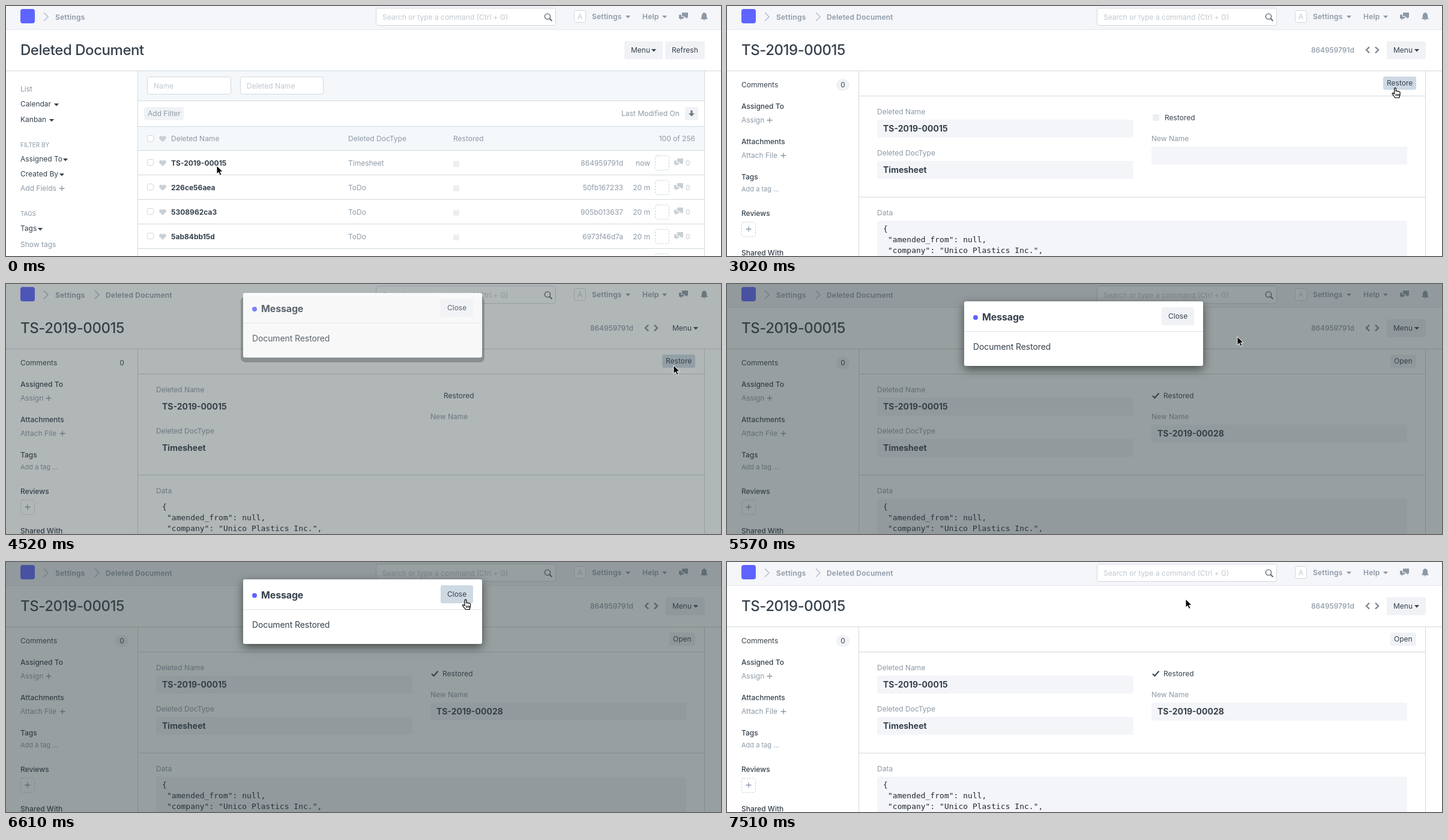
These frames come from a looping animation (1191x418 px, 8 s). An HTML page:

```html
<!DOCTYPE html>
<html lang="en">
<head>
<meta charset="utf-8">
<title>Restore a deleted document</title>
<style>
html, body { margin: 0; width: 100%; height: 100%; overflow: hidden; background: #fff; }
svg { display: block; width: 1191px; height: 418px; }
text { font: 400 12px Inter, sans-serif; fill: #36414c; white-space: pre; }
.grey { fill: #8d99a6; }
.pale { fill: #c0c8cf; }
.med { font-weight: 500; }
.bold { font-weight: 700; }
.nav { font-weight: 600; letter-spacing: .2px; fill: #8d99a6; }
.title { font-size: 24px; font-weight: 500; letter-spacing: -.45px; }
.value { font-size: 14px; font-weight: 700; }
.body { font-size: 14px; letter-spacing: -.1px; }
.head { font-size: 16px; font-weight: 700; letter-spacing: -.15px; }
.caps { font-size: 10px; fill: #8d99a6; }
.small { font-size: 11px; fill: #8d99a6; }
.code { font: 13px "DejaVu Sans Mono", monospace; fill: #1f272e; }
.end { text-anchor: end; }
.mid { text-anchor: middle; }
.line { stroke: #d1d8dd; fill: none; }
.box { stroke: #d1d8dd; fill: #fff; }
.flat .fill { opacity: 0; }
</style>
</head>
<body>
<svg id="stage" viewBox="0 0 1191 418" xmlns="http://www.w3.org/2000/svg"></svg>
<script>
const PANEL = '#f4f5f9', BUTTON = '#f0f2f6', HOVER = '#cdd9e3', TINT = '#f4f8fb', DARK = '#36414c', GREY = '#8d99a6', PALE = '#c8d0d6';

const text = (x, y, str, cls = '') => `<text x="${x}" y="${y}" class="${cls}">${str}</text>`;
const rect = (x, y, w, h, fill, r = 0, extra = 'class="fill"') =>
  `<rect x="${x}" y="${y}" width="${w}" height="${h}" rx="${r}" fill="${fill}" ${extra}/>`;
const box = (x, y, w, h, r = 3) => rect(x + .5, y + .5, w - 1, h - 1, '#fff', r, 'class="box"');
const dashed = (x, y) => rect(x + .5, y + .5, 23, 24, 'none', 3, 'stroke="#cbd2d8" stroke-dasharray="3 2"');
const hline = (y, x1 = 220, x2 = 1163) => `<path class="line" d="M${x1} ${y + .5}H${x2}"/>`;
const caret = (x, y, fill = DARK) => `<path d="M${x - 4} ${y - 2}h8l-4 4.5z" fill="${fill}"/>`;
const plus = (x, y) => `<path d="M${x - 4.5} ${y}h9M${x} ${y - 4.5}v9" stroke="${GREY}" stroke-width="1.3"/>`;
const chevron = (x, y, w, h, color, width) =>
  `<path d="M${x} ${y - h}l${w} ${h}l${-w} ${h}" fill="none" stroke="${color}" stroke-width="${width}"/>`;
const heart = (x, y) =>
  `<path transform="translate(${x} ${y})" fill="${PALE}" d="M0 5.5L-5.2 .2C-7.6-2.7-3.4-7 0-3.2 3.4-7 7.6-2.7 5.2 .2z"/>`;
const chat = (x, y, fill) => `<g transform="translate(${x} ${y})" fill="${fill}">
  <path d="M5 0h10v8h-1.500v2.500l-2.500-2.500H9V6H5z"/><path d="M0 3.500h4V7h4v3H5l-2.500 2.800V10H0z"/></g>`;
const group = (id, body) => `<g id="${id}">${body}</g>`;

const header = rect(0, 0, 1191, 39, '#f5f6fa') + rect(0, 39, 1191, 1, '#e6e9ee')
  + rect(24, 5, 24, 24, '#5e64ff', 4, '')
  + chevron(63, 18, 7, 7, '#b8c2cc', 1.6) + text(82, 23, 'Settings', 'nav')
  + box(616, 3, 300, 30) + text(627, 23, 'Search or type a command (Ctrl + G)', 'pale')
  + `<g fill="none" stroke="#5b6670"><circle cx="902" cy="17.500" r="4.600" stroke-width="1.400"/>
     <path d="M905.500 21l4 4" stroke-width="2"/></g>`
  + box(946, 7, 20, 21) + text(956, 22, 'A', 'pale mid')
  + text(976, 22, 'Settings', 'nav') + caret(1036, 18, GREY)
  + text(1060, 22, 'Help', 'nav') + caret(1097, 18, GREY)
  + chat(1121, 11, GREY)
  + `<path fill="${GREY}" d="M1162 11.500q1-1.500 2 0 3 .8 3 4.500 0 4 2 6h-12q2-2 2-6 0-3.700 3-4.500zM1161 22.500h4q-2 2.800-4 0z"/>`
  + hline(108, 0, 1191) + `<path class="line" d="M219.500 109V418M1163.500 109V418"/>`;

const rows = [
  ['TS-2019-00015', 'Timesheet', '864959791d', 'now'],
  ['226ce56aea', 'ToDo', '50fb167233', '20 m'],
  ['5308962ca3', 'ToDo', '905b013637', '20 m'],
  ['5ab84bb15d', 'ToDo', '6973f46d7a', '20 m']
].map(([name, type, id, age], i) => {
  const y = 242 + i * 41;
  return box(235, y + 14, 11, 11, 2) + heart(261, y + 20.5)
    + text(275, y + 25, name, 'bold') + text(570, y + 25, type, 'grey')
    + rect(745, y + 17, 10, 10, '#eceff2', 2) + text(1028, y + 25, id, 'grey end')
    + text(1073, y + 25, age, 'grey end') + dashed(1081, y + 8)
    + chat(1113, y + 13, PALE) + text(1132, y + 25, '0', 'pale') + hline(y + 40);
}).join('');

const list = text(24, 82, 'Deleted Document', 'title')
  + rect(1030, 59, 64, 30, BUTTON, 3) + text(1041, 78, 'Menu') + caret(1079, 74)
  + rect(1098, 59, 66, 30, BUTTON, 3) + text(1109, 78, 'Refresh')
  + text(24, 143, 'List', 'grey')
  + text(24, 168, 'Calendar') + caret(84, 165) + text(24, 194, 'Kanban') + caret(76, 191)
  + text(24, 236, 'FILTER BY', 'caps')
  + text(24, 260, 'Assigned To') + caret(99, 257) + text(24, 285, 'Created By') + caret(93, 282)
  + text(24, 309, 'Add Fields', 'grey') + plus(93, 305)
  + text(24, 351, 'TAGS', 'caps') + text(24, 376, 'Tags') + caret(57, 373)
  + text(24, 403, 'Show tags', 'grey')
  + rect(220, 109, 943, 49, TINT) + hline(158)
  + box(235, 118, 140, 30) + text(246, 138, 'Name', 'pale')
  + box(390, 118, 139, 30) + text(401, 138, 'Deleted Name', 'pale')
  + rect(230, 169, 66, 22, BUTTON, 3) + text(236, 184, 'Add Filter', 'grey')
  + text(1025, 184, 'Last Modified On', 'grey') + rect(1131, 169, 22, 22, BUTTON, 3)
  + `<path d="M1140.500 174.500h3v5h3.500l-5 5-5-5h3.500z" fill="#6c7680"/>`
  + hline(201) + rect(220, 202, 943, 39, TINT)
  + box(235, 216, 11, 11, 2) + heart(261, 222)
  + text(275, 226, 'Deleted Name', 'grey') + text(570, 226, 'Deleted DocType', 'grey')
  + text(745, 226, 'Restored', 'grey') + text(1148, 226, '100 of 256', 'grey end')
  + hline(241) + rows + dashed(1081, 414)
  + rect(275, 269, 96, 1, DARK, 0, 'id="underline"');

const field = (x, y, w, label, value) =>
  text(x, y + 5, label, 'grey') + rect(x, y + 14, w, 30, PANEL, 3) + value;

const form = chevron(148, 18, 7, 7, '#b8c2cc', 1.6) + text(166, 23, 'Deleted Document', 'nav')
  + text(24, 82, 'TS-2019-00015', 'title') + text(973, 78, '864959791d', 'grey med')
  + chevron(1070, 73.5, -5, 5, '#7d8993', 2.4) + chevron(1080, 73.5, 5, 5, '#7d8993', 2.4)
  + rect(1099, 59, 65, 30, BUTTON, 3) + text(1110, 78, 'Menu') + caret(1149, 74)
  + text(24, 136, 'Comments') + rect(182, 122, 22, 20, BUTTON, 10) + text(193, 136, '0', 'mid')
  + text(24, 172, 'Assigned To', 'med') + text(24, 195, 'Assign', 'grey') + plus(71, 191)
  + text(24, 231, 'Attachments', 'med') + text(24, 254, 'Attach File', 'grey') + plus(94, 250)
  + text(24, 290, 'Tags', 'med') + text(24, 310, 'Add a tag ...', 'small')
  + text(24, 351, 'Reviews', 'med') + dashed(24, 361) + plus(36, 373)
  + text(24, 417, 'Shared With', 'med')
  + hline(150) + hline(319)
  + field(250, 176, 427, 'Deleted Name', text(260, 210, 'TS-2019-00015', 'value'))
  + field(250, 245, 427, 'Deleted DocType', text(260, 279, 'Timesheet', 'value'))
  + field(707, 221, 426, 'New Name', '')
  + text(250, 350, 'Data', 'grey') + rect(250, 359, 883, 70, PANEL, 3)
  + text(260, 377, '{', 'code') + text(268, 395, '"amended_from": null,', 'code')
  + text(268, 413, '"company": "Unico Plastics Inc.",', 'code')
  + group('pending', rect(1093, 118, 55, 22, BUTTON, 3, 'id="restore"') + text(1099, 133, 'Restore')
    + rect(709, 181, 11, 11, '#eceff2', 2) + text(729, 191, 'Restored'))
  + group('restored', rect(1105, 118, 43, 22, BUTTON, 3) + text(1111, 133, 'Open')
    + `<path d="M709 187l3.500 3.500 7-8" fill="none" stroke="${DARK}" stroke-width="2"/>`
    + text(727, 191, 'Restored') + text(717, 255, 'TS-2019-00028', 'value'));

const modal = rect(391, 6, 406, 110, '#3f474b', 8, 'id="band" fill-opacity=".35"')
  + rect(395, 0, 398, 108, '#fff', 3, 'id="sheet"')
  + group('content', `<circle cx="414" cy="27" r="4" fill="#5e64ff"/>`
    + text(425, 32, 'Message', 'head') + rect(724, 10, 54, 30, BUTTON, 3, 'id="close"')
    + text(735, 29, 'Close') + rect(395, 50, 398, 1, '#dfe4e8', 0, '')
    + text(410, 81, 'Document Restored', 'body" id="message'));

const cursors = `<path id="arrow" d="M0 0V14l3.200-3 2.400 5.300 2.500-1.100-2.400-5.100h4.500z" fill="#000" stroke="#fff"/>
  <path id="hand" fill="#fff" stroke="#000" stroke-width="1.200" stroke-linejoin="round"
   d="M-1.400 10V1.300a1.400 1.400 0 0 1 2.800 0V5.500q1.400-1 2.400 .2 1.400-.7 2.300 .4 2-.2 2 1.600v3q0 2.500-1.300 4.500v1.300H0q-.8-1.700-2.500-3.400-2-2.300-2.400-3.400-.2-1.600 1.400-1.400zM1.400 10v3.500M3.800 10v3.500M6 10v3.500"/>`;

const stage = document.getElementById('stage');
stage.innerHTML = header + group('list', list) + group('form', form)
  + rect(0, 0, 1191, 418, '#334143', 0, 'id="shade"') + group('modal', modal) + group('cursor', cursors);
const el = id => document.getElementById(id);
const show = (id, on) => { el(id).style.display = on ? '' : 'none'; };

// Each step changes part of the state; the rest carries over.
const steps = [
  [0, { page: 'list', x: 351, y: 267, hand: false, link: false, restored: false, hot: false, shade: 0, top: 0, fade: 1, closeHot: false }],
  [500, { hand: true, link: true, x: 353 }],
  [1250, { page: 'form', hand: false, x: 351 }],
  [2000, { x: 690, y: 195 }],
  [2150, { x: 884, y: 201 }],
  [2440, { x: 920, y: 195 }],
  [2590, { x: 1000, y: 175 }],
  [2740, { x: 1070, y: 155 }],
  [2890, { x: 1110, y: 139, hand: true, hot: true }],
  [3020, { x: 1113, y: 137 }],
  [4520, { x: 1112, y: 136, hand: false, shade: .38, top: 15, fade: .8 }],
  [4670, { restored: true, shade: .5, top: 27, fade: 1 }],
  [4820, { top: 29 }],
  [4970, { x: 1090, y: 130 }],
  [5120, { x: 1020, y: 118 }],
  [5270, { x: 940, y: 104 }],
  [5420, { x: 878, y: 92 }],
  [5570, { x: 850, y: 88 }],
  [5720, { x: 815, y: 84 }],
  [5870, { x: 790, y: 82 }],
  [6020, { x: 772, y: 80 }],
  [6160, { x: 768, y: 78 }],
  [6460, { x: 767, y: 68, hand: true, closeHot: true }],
  [6610, { x: 765.5, y: 63 }],
  [7360, { shade: .28, top: 20, fade: .5 }],
  [7510, { x: 764, y: 62, hand: false, shade: 0, fade: 1 }]
];
const LOOP = 8000;

function draw(time) {
  const s = Object.assign({}, ...steps.filter(([at]) => at <= time).map(([, change]) => change));
  const fading = s.fade < 1;
  show('list', s.page === 'list');
  show('form', s.page === 'form');
  show('underline', s.link);
  show('pending', !s.restored);
  show('restored', s.restored);
  show('modal', s.shade > 0);
  show('band', fading);
  show('message', s.fade > .5);
  show('arrow', !s.hand);
  show('hand', s.hand);
  stage.classList.toggle('flat', fading);
  el('restore').setAttribute('fill', s.hot ? HOVER : BUTTON);
  el('close').setAttribute('fill', s.closeHot ? HOVER : BUTTON);
  el('shade').style.opacity = s.shade;
  el('content').style.opacity = s.fade;
  el('sheet').style.fillOpacity = fading ? .94 : 1;
  el('sheet').style.filter = fading ? 'none' : 'drop-shadow(0 5px 8px rgba(0,0,0,.55))';
  el('modal').setAttribute('transform', `translate(0 ${s.top})`);
  el('cursor').setAttribute('transform', `translate(${s.x} ${s.y})`);
}

const start = performance.now();
function tick() {
  draw((performance.now() - start) % LOOP);
  requestAnimationFrame(tick);
}
tick();
</script>
</body>
</html>
```
